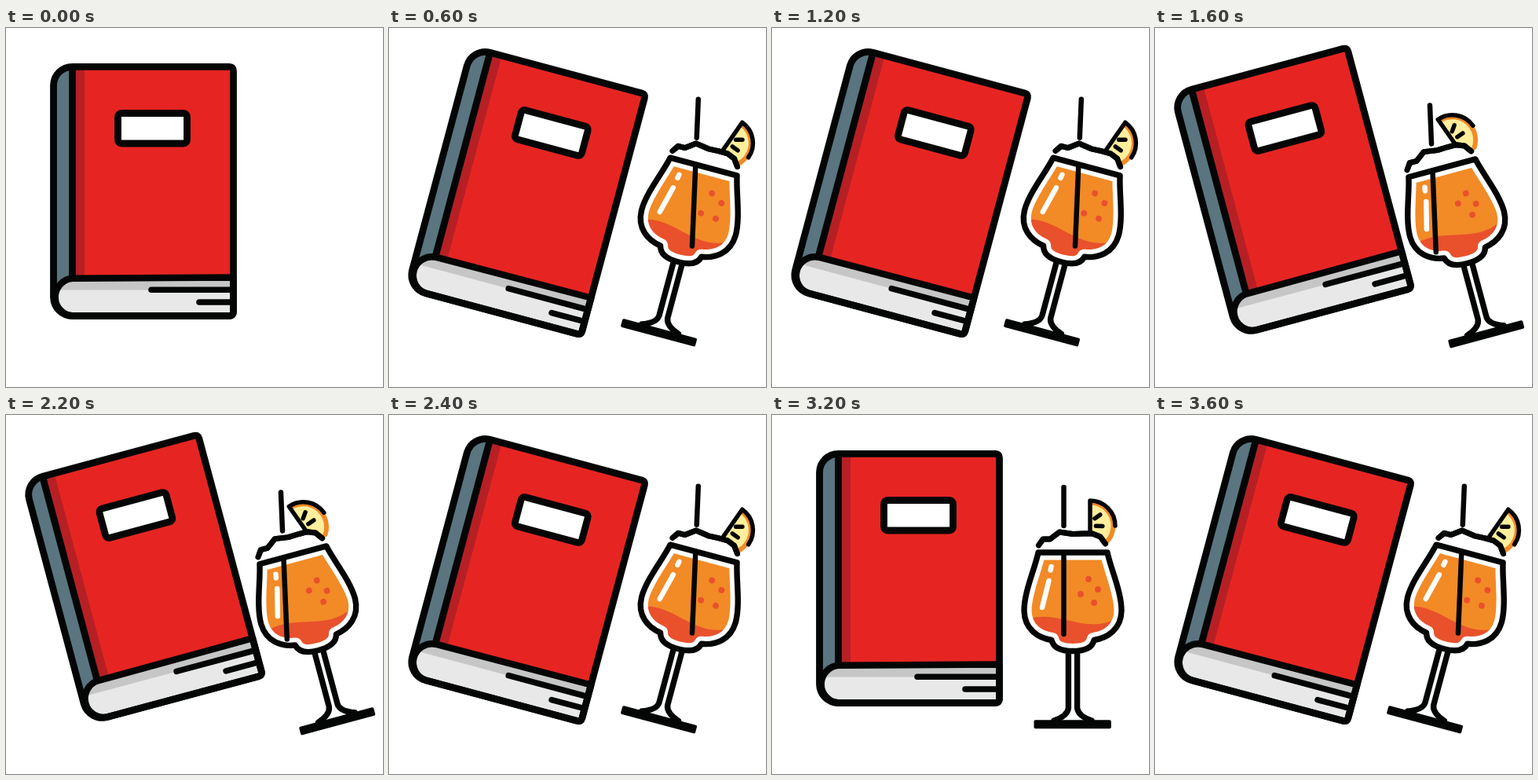
An HTML page with a canvas that plays this animation: 480 px wide and 457 px high, repeating every 3.8 s.

```html
<!DOCTYPE html>
<html lang="en">
<head>
<meta charset="utf-8">
<title>Book and cocktail</title>
<style>
html, body { margin: 0; width: 100%; height: 100%; overflow: hidden; background: #fff; }
canvas { display: block; width: 480px; height: 457px; }
</style>
</head>
<body>
<canvas id="stage" width="480" height="457"></canvas>
<script>
const ctx = document.getElementById('stage').getContext('2d');
const STEP = 200, STEPS = 19;
const RAD = Math.PI / 180;
const INK = '#040606', RED = '#e62522', DARK_RED = '#b62025', SLATE = '#5a7580';
const PAGE = '#e8e8e8', SHADE = '#c6c6c6';
const ORANGE = '#f28a26', DEEP = '#e8512c', FLESH = '#ffee9c';

function fill(path, color) {
  ctx.fillStyle = color;
  ctx.fill(path);
}

function stroke(path, width, color = INK) {
  ctx.lineWidth = width;
  ctx.strokeStyle = color;
  ctx.stroke(path);
}

function box(x, y, w, h, color) {
  ctx.fillStyle = color;
  ctx.fillRect(x, y, w, h);
}

function line(x1, y1, x2, y2, width, color) {
  stroke(new Path2D(`M${x1} ${y1}L${x2} ${y2}`), width, color);
}

// Runs draw with the origin at (x, y), turned by deg.
function at(x, y, deg, draw) {
  ctx.save();
  ctx.translate(x, y);
  ctx.rotate(deg * RAD);
  draw();
  ctx.restore();
}

const cover = new Path2D('M60.5 343V73A24 24 0 0 1 84.5 49.3H284.5Q289.5 49.3 289.5 54.3V361.5Q289.5 366.5 284.5 366.5H85A24.2 24.2 0 0 1 60.5 343Z');
const pages = new Path2D('M289.5 317.6L85 318.8A23.9 23.9 0 0 0 85 366.5H284.5Q289.5 366.5 289.5 361.5Z');
const label = new Path2D('M147.5 108.5H225.5Q230.5 108.5 230.5 113.5V142Q230.5 147 225.5 147H147.5Q142.5 147 142.5 142V113.5Q142.5 108.5 147.5 108.5Z');

function drawBook() {
  ctx.save();
  ctx.clip(cover);
  box(56, 45, 238, 326, RED);
  box(56, 45, 44, 326, DARK_RED);
  box(56, 45, 29, 326, SLATE);
  ctx.restore();

  ctx.save();
  ctx.clip(pages);
  box(56, 314, 238, 57, PAGE);
  box(56, 314, 238, 19.5, SHADE);
  ctx.restore();

  line(84.5, 51, 84.5, 318, 8.8);
  line(185, 333.3, 288, 333.3, 7.6);
  line(246, 349, 288, 349, 7.6);
  stroke(pages, 8.5);
  stroke(cover, 8.8);
  fill(label, '#fff');
  stroke(label, 8.8);
}

// Glass parts are drawn around its centre.
const bowl = new Path2D('M-44 -71C-48 -51 -62 -21 -62 3C-61.5 27 -44 38 -27 40.5C-25 50 -16 54.5 0 54.5C16 54.5 25 50 27 40.5C44 38 61.5 27 62 3C62 -21 48 -51 44 -71Z');
const ice = 'M-43.5 -80L-38 -88L-29 -88L-17 -97L0 -94.5L13 -95L25 -95L35 -91L41.5 -82';
const iceLine = new Path2D(ice);
const iceFill = new Path2D(ice + 'L56 -84V-72H-43.5Z');
const wave = new Path2D('M-55 13C-18 2 18 34 55 13V60H-55Z');
const stem = new Path2D('M-5.6 57V127Q-6.5 137 -24 143M5.6 57V127Q6.5 137 24 143');
const foot = new Path2D('M-47.5 144.3H46.8V151.3H-47.5Z');

const BUBBLES = {
  '1': [[19, -41], [34, -32], [12, -13], [32, -11]],
  '0': [[20, -37], [32, -24], [10, -18], [27, -7]],
  '-1': [[21, -32], [30, -16], [8, -22], [22, -3.5]]
};

function halfDisc(radius, color) {
  ctx.beginPath();
  ctx.arc(0, 0, radius, -Math.PI / 2, Math.PI / 2);
  ctx.fillStyle = color;
  ctx.fill();
}

function drawSlice() {
  halfDisc(32.5, ORANGE);
  halfDisc(26.5, FLESH);
  line(12.8, -14, 6, -9.3, 5.5);
  line(15.8, 0.4, 7.4, 0.3, 5.5);
  stroke(new Path2D('M0 30V-32A32 32 0 0 1 32 0'), 5.5);
}

function drawLiquid(pose) {
  ctx.save();
  ctx.clip(bowl);
  box(-65, -75, 130, 135, ORANGE);
  fill(wave, DEEP);
  ctx.restore();

  ctx.fillStyle = DEEP;
  for (const [x, y] of BUBBLES[pose]) {
    ctx.beginPath();
    ctx.arc(x, y, 3.9, 0, 2 * Math.PI);
    ctx.fill();
  }
  line(-27.5, -53, -28.3, -48.5, 6.5, '#fff');
  line(-30.5, -35, -39, -1, 6.5, '#fff');
}

function drawGlass(pose) {
  const straw = (from, to) =>
    at(-11.5, -75, -12.6 * pose, () => line(0, from, 0, to, 6.5));

  at(22, -105 - 3 * pose, 20 * pose, drawSlice);
  straw(-79, -30);
  fill(iceFill, '#fff');
  stroke(iceLine, 7);

  drawLiquid(pose);
  stroke(bowl, 19, '#fff');
  stroke(iceLine, 7);
  straw(4, 108);
  stroke(stem, 7.4);
  stroke(bowl, 7.4);
  fill(foot, INK);
  stroke(foot, 4);
}

// pose: 1 leans right, 0 stands upright, -1 leans left
function draw(step) {
  const pose = step ? [1, 0, -1][step % 3] : 0;
  box(0, 0, 480, 457, '#fff');
  ctx.lineCap = ctx.lineJoin = 'round';
  at(175, 208, 15 * pose, () => {
    ctx.translate(-175, -208);
    drawBook();
  });
  if (step) at(383 - 0.8 * pose, 246 - 0.9 * pose, 15 * pose, () => drawGlass(pose));
}

const start = performance.now();
function tick() {
  draw(Math.floor((performance.now() - start) / STEP) % STEPS);
  requestAnimationFrame(tick);
}
tick();
</script>
</body>
</html>
```
